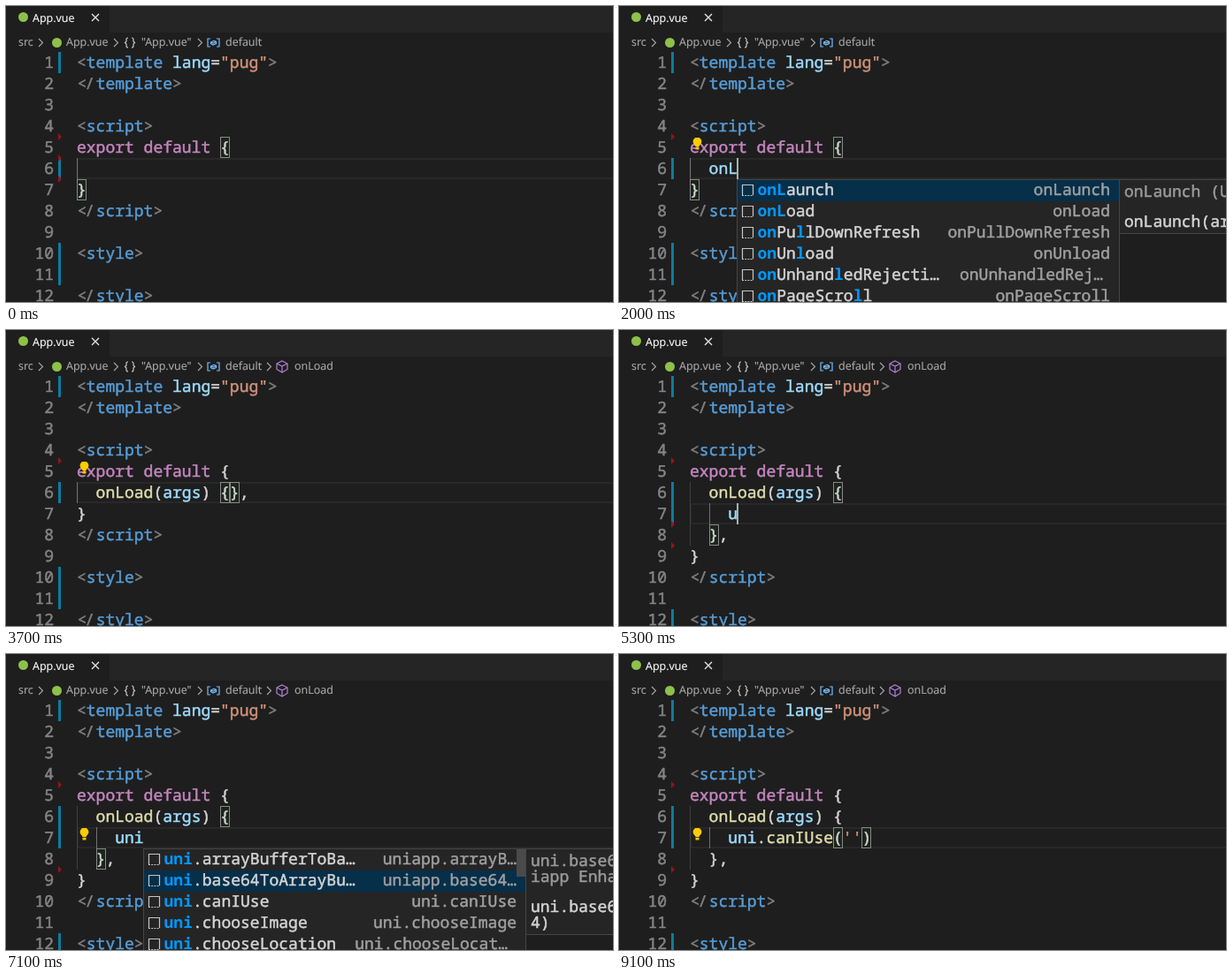
An HTML page that plays this animation: 686x335 px, repeating every 9.6 s.

```html
<!DOCTYPE html>
<html lang="en">
<head>
<meta charset="utf-8">
<title>Editor completion</title>
<style>
  html, body { margin: 0; width: 100%; height: 100%; overflow: hidden; background: #1e1e1e; }
  #stage { position: absolute; left: 0; top: 0; width: 686px; height: 335px; overflow: hidden; background: #1e1e1e; color: #d4d4d4; }
  #stage div, #stage svg { position: absolute; box-sizing: border-box; }
  .mono { font: 500 18px/24px "Noto Sans Mono", "DejaVu Sans Mono", monospace; white-space: pre; text-rendering: geometricPrecision; -webkit-text-stroke: .5px; }
  .ui { font: 12.5px/18px "Open Sans", "Noto Sans", sans-serif; color: #a9a9a9; white-space: pre; text-rendering: geometricPrecision; -webkit-text-stroke: .15px; }
  i { font-style: normal; }
  .g { color: #808080; }
  .b { color: #569cd6; }
  .a { color: #9cdcfe; }
  .s { color: #ce9178; }
  .k { color: #c586c0; }
  .y { color: #dcdcaa; }
  .m { color: #0097fb; font-weight: 700; -webkit-text-stroke: 0; }
  .lt { position: relative; left: .5px; }
  .sl { position: relative; left: -1.5px; }
  .num { left: 0; width: 54px; text-align: right; color: #858585; }
  .tabs { left: 117px; top: 0; width: 569px; height: 30px; background: #252526; }
  .dot { width: 11px; height: 11px; border-radius: 50%; background: #8dc149; }
  .current { left: 80px; width: 616px; height: 24px; border: 2px solid #282828; }
  .guide { width: 1px; background: #404040; }
  .guide.on { background: #707070; }
  .bracket { width: 11px; height: 24px; border: 1px solid #888; background: rgba(0, 100, 0, .1); }
  .caret { width: 2px; height: 24px; background: #aeafad; }
  .bar { left: 59px; width: 3px; background: #0c7d9d; }
  .cut { left: 59px; border: solid transparent; border-width: 4px 0 4px 4px; border-left-color: #94151b; }
  .list { width: 433px; height: 290px; background: #252526; border: 1px solid #454545; overflow: hidden; }
  .item { left: 0; width: 431px; height: 24px; }
  .item.on { background: #062f4a; }
  .item .label { left: 22.5px; top: -1px; }
  .item .detail { top: -1px; color: #a0a0a0; }
  .thumb { right: 0; top: 0; width: 10px; height: 31px; background: #4a4a4a; }
  .doc { width: 300px; background: #252526; border: 1px solid #454545; }
  .doc .mono { left: 5px; }
  .doc .note { color: #9a9a9a; }
</style>
</head>
<body>
<div id="stage">
  <div class="tabs"></div>
  <div class="dot" style="left:14px;top:7px"></div>
  <div class="ui" style="left:30px;top:5px;color:#fff">App.vue</div>
  <svg style="left:96px;top:8px" width="10" height="10"><path d="M1 1l8 8M9 1l-8 8" stroke="#e8e8e8" stroke-width="1.3"/></svg>
  <div id="crumbs"></div>
  <div id="editor"></div>
</div>
<script>
const LOOP = 9600, STEP = 100, CW = 10.8, X0 = 80, ROW = 24;
const crumbs = document.getElementById('crumbs');
const editor = document.getElementById('editor');

const colX = c => X0 + c * CW;
const caretX = c => Math.floor(colX(c) - 0.5);
const rowY = r => 52 + (r - 1) * ROW;
const esc = s => s.replace(/&/g, '&amp;').replace(/</g, '&lt;');
const div = (cls, style, body = '') => `<div class="${cls}" style="${style}">${body}</div>`;
const span = (cls, s) => `<i class="${cls}">${esc(s)}</i>`;

// Each token is a class letter followed by its text.
const paint = line => line.split('|').map(t =>
  t === 'g</' ? span('g lt', '<') + span('g sl', '/') : span(t[0], t.slice(1))).join('');

const head = ['g<|btemplate|f |alang|f=|s"pug"|g>', 'g</|btemplate|g>', '', 'g<|bscript|g>', 'kexport default|f {'];
const tail = ['f}', 'g</|bscript|g>', '', 'g<|bstyle|g>', '', 'g</|bstyle|g>'];
const method = 'f  |yonLoad|f(|aargs|f) {';

// label, detail, gap left by a shortened detail
const events = [['on', 'event handler'], ['onAddToFavorites'], ['onBackPress'], ['onError'], ['onHide'], ['onLaunch']];
const hooks = [['onLaunch'], ['onLoad'], ['onPullDownRefresh'], ['onUnload'],
  ['onUnhandledRejecti…', 'onUnhandledRej…', 8], ['onPageScroll']];
const apis = [['uni.arrayBufferToBa…', 'uniapp.arrayB…'], ['uni.base64ToArrayBu…', 'uniapp.base64…'],
  ['uni.canIUse'], ['uni.chooseImage'], ['uni.chooseLocation', 'uni.chooseLocat…', 10]];

// notes, then code
const docs = {
  on: [['event handler', '段)'], ["emitter.on('e", '(arguments) =', '', '})']],
  onLaunch: [['onLaunch (UniApp)'], ['onLaunch(args) {']],
  onLoad: [['onLoad (UniApp)'], ['onLoad(args) {']],
  array: [['uni.arrayB', 'iapp Enhan'], ['uni.arrayB', 'Buffer)']],
  base64: [['uni.base64', 'iapp Enhan'], ['uni.base64', '4)']],
  canIUse: [['uni.canIUs', 'iapp Enhan'], ['uni.canIUs']]
};

// Changes that accumulate over the loop.
const script = [
  [0, { text: '', open: false, caret: 2, blink: false, list: null, crumb: '', bulb: 0,
        pairs: [[5, 15], [7, 0]], bars: [[1, 1], [6, 1], [10, 2]], cuts: [148, 172, 196] }],
  [700, { blink: true }],
  [1200, { blink: false }],
  [1500, { text: 'f  |ao', caret: 3, blink: true }],
  [1600, { list: events, query: 'o', pick: 0, doc: 'on' }],
  [1700, { text: 'f  |aon', caret: 4, query: 'on' }],
  [1900, { text: 'f  |aonL', caret: 5, list: hooks, query: 'onL', doc: 'onLaunch' }],
  [2000, { bulb: 5, cuts: [148] }],
  [2300, { crumb: 'onL' }],
  [2400, { blink: false }],
  [2900, { blink: true }],
  [3000, { pick: 1, doc: 'onLoad' }],
  [3300, { text: method + '},', caret: 16, list: null, pairs: [[6, 15], [6, 16]] }],
  [3600, { crumb: 'onLoad' }],
  [3700, { blink: false }],
  [4000, { text: '', open: true, caret: 4, blink: true, pairs: [[6, 15], [8, 2]], bars: [[1, 1], [6, 1], [12, 2]] }],
  [4200, { bulb: 0, bars: [[1, 1], [6, 2], [12, 2]], cuts: [148, 220, 244] }],
  [4500, { blink: false }],
  [5000, { blink: true }],
  [5300, { text: 'f    |au', caret: 5 }],
  [5400, { text: 'f    |aun', caret: 6, list: apis, query: 'un', pick: 0, doc: '' }],
  [5500, { text: 'f    |auni', caret: 7, query: 'uni' }],
  [5600, { doc: 'array' }],
  [5800, { cuts: [148, 244] }],
  [5900, { bulb: 7 }],
  [6100, { blink: false }],
  [6500, { blink: true }],
  [7000, { blink: false }],
  [7100, { pick: 1, doc: 'base64' }],
  [7200, { pick: 2, doc: 'canIUse' }],
  [7400, { blink: true }],
  [7700, { text: "f    |auni|f.|ycanIUse|f(|s''|f)", caret: 17, list: null, pairs: [[7, 15], [7, 18]] }],
  [8200, { blink: false }],
  [8600, { blink: true }],
  [9100, { blink: false }]
];

const stateAt = t => Object.assign({}, ...script.filter(s => s[0] <= t).map(s => s[1]));

const svg = (x, y, w, h, body, color) =>
  `<svg style="left:${x}px;top:${y}px" width="${w}" height="${h}" fill="none" stroke="${color}">${body}</svg>`;
const word = (x, s) => div('ui', `left:${x}px;top:32px`, s);
const chevron = x => svg(x, 36, 7, 11, '<path d="M1 1l4.5 4.5L1 10" stroke-width="1.1"/>', '#a9a9a9');

function drawCrumbs(name) {
  let out = word(14, 'src') + [36, 121, 216].map(chevron).join('') +
    div('dot', 'left:52px;top:36px') + word(68, 'App.vue') +
    svg(133, 35, 14, 13, '<path d="M5 1Q3 1 3 3V5L1.5 6.5L3 8V10Q3 12 5 12M9 1Q11 1 11 3V5L12.5 6.5L11 8V10Q11 12 9 12" stroke-width="1.2"/>', '#c5c5c5') +
    word(153, '"App.vue"') +
    svg(227, 36, 15, 11, '<path d="M4 1H1V10H4M11 1H14V10H11M4.5 5L8 3.3L10.5 4.5V6.5L7 8L4.5 6.7ZL7 6L10.5 4.5" stroke-width="1.2"/>', '#75beff') +
    word(248, 'default');
  if (name) {
    out += chevron(294) + word(326, name) + (name === 'onL'
      ? svg(305, 34, 15, 15, '<path d="M9.5 1.5Q6 2.5 7 6.5L1.5 12Q1.5 14 3.5 13.5L8.5 8.2Q13 9 13.5 4.5L11 6.5L8.8 4.5L10.8 2Z" stroke-width="1.2"/>', '#c5c5c5')
      : svg(305, 34, 14, 15, '<path d="M7 1L13 4V10.5L7 14L1 10.5V4ZM1 4L7 7L13 4M7 7V14" stroke-width="1.2"/>', '#b180d7'));
  }
  return out;
}

// Highlights the query letters in order of first occurrence.
function match(label, query) {
  let n = 0;
  return [...label].map(ch => {
    const hit = n < query.length && ch.toLowerCase() === query[n].toLowerCase();
    if (hit) n++;
    return span(hit ? 'm' : 'f', ch);
  }).join('');
}

const snippetIcon = svg(4, 4, 15, 15,
  '<path d="M1.5 13V1.5H13.5V13" stroke-width="1.2"/><path d="M1 13.5H14" stroke-width="1.2" stroke-dasharray="2 1.2"/>', '#c5c5c5');

function drawDoc(doc, x, y) {
  let mid = 14.5, out = '';
  doc.forEach((part, p) => {
    if (p) mid += 16;
    part.forEach(line => {
      out += div(p ? 'mono' : 'mono note', `top:${mid - 14}px`, esc(line));
      mid += 18;
    });
  });
  return div('doc', `left:${x}px;top:${y}px;height:${Math.round(mid - 5)}px`, out);
}

function drawList(s, row) {
  const x = caretX(s.caret), y = rowY(row + 1);
  const items = s.list.map(([label, detail = label, gap = 0], i) =>
    div(i === s.pick ? 'item on' : 'item', `top:${i * ROW}px`,
      snippetIcon + div('mono label', '', match(label, s.query)) +
      div('mono detail', `right:${10 + gap}px`, detail))).join('');
  const thumb = s.list === apis ? div('thumb', '') : '';
  return div('list', `left:${x}px;top:${y}px`, items + thumb) +
    (s.doc ? drawDoc(docs[s.doc], x + 432, y) : '');
}

const drawBulb = row => svg(82, rowY(row) + 0.5, 13, 15,
  '<path d="M4.5 10.2Q4.5 9.2 3 7.8A4.9 4.9 0 1 1 10 7.8Q8.5 9.2 8.5 10.2ZM4.5 11H8.5V13.5H4.5Z" fill="#fc0"/>', 'none');

const guide = (x, row, n, on) => div(on ? 'guide on' : 'guide', `left:${x}px;top:${rowY(row)}px;height:${n * ROW}px`);

function drawEditor(s) {
  const row = s.open ? 7 : 6;
  const lines = [...head, ...(s.open ? [method, s.text, 'f  },'] : [s.text]), ...tail].slice(0, 12);
  let out = div('current', `top:${rowY(row)}px`);
  out += s.open ? guide(80, 6, 3) + guide(102, 7, 1, true) : guide(80, 6, 1, true);
  out += s.pairs.map(([r, c]) => div('bracket', `left:${Math.round(colX(c))}px;top:${rowY(r)}px`)).join('');
  lines.forEach((line, i) => {
    const top = `top:${rowY(i + 1)}px`;
    out += div('mono num', top, i + 1);
    if (line) out += div('mono', `left:${X0}px;${top}`, paint(line));
  });
  out += s.bars.map(([r, n]) => div('bar', `top:${rowY(r)}px;height:${n * ROW}px`)).join('');
  out += s.cuts.map(y => div('cut', `top:${y - 4}px`)).join('');
  if (s.blink) out += div('caret', `left:${caretX(s.caret)}px;top:${rowY(row)}px`);
  if (s.bulb) out += drawBulb(s.bulb);
  if (s.list) out += drawList(s, row);
  return out;
}

let shown = -1;
function frame() {
  const t = Math.floor(performance.now() % LOOP / STEP) * STEP;
  if (t !== shown) {
    shown = t;
    const s = stateAt(t);
    crumbs.innerHTML = drawCrumbs(s.crumb);
    editor.innerHTML = drawEditor(s);
  }
  requestAnimationFrame(frame);
}
frame();
</script>
</body>
</html>
```
